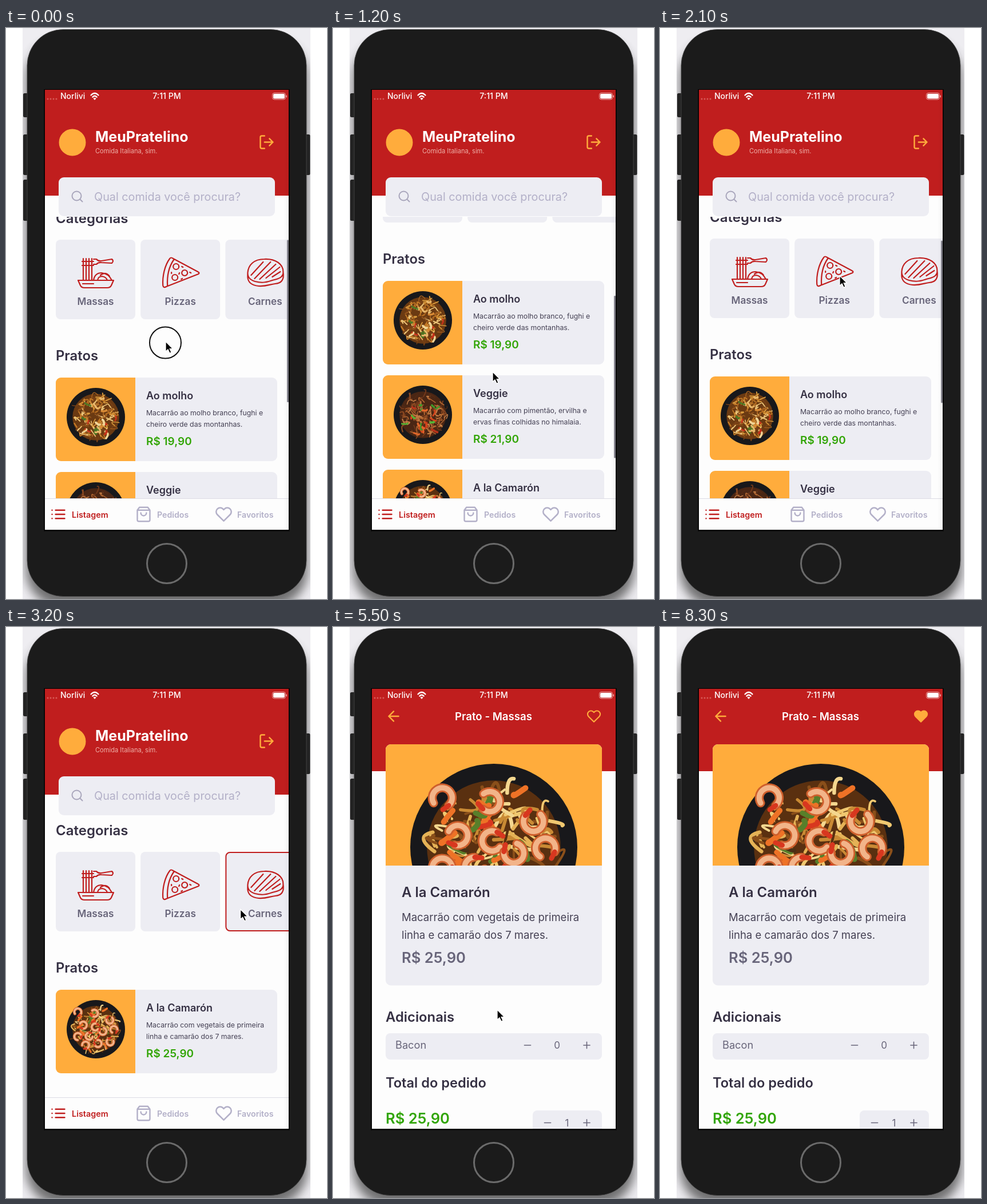
Animation of 561 by 998 pixels, one loop 8.4 s. Source, as an HTML page:

```html
<!DOCTYPE html>
<html lang="pt">
<head>
<meta charset="utf-8">
<title>Cardápio</title>
<style>
  html, body { margin: 0; width: 100%; height: 100%; overflow: hidden; background: #fff; }
  svg { display: block; width: 561px; height: 998px; }
  text { font-family: Inter, "Open Sans", sans-serif; white-space: pre; }
  .line { fill: none; stroke-linecap: round; stroke-linejoin: round; }
</style>
</head>
<body>
<script>
const RED = '#c01e1e', ORANGE = '#ffac3c', PANEL = '#ededf3', INK = '#353043',
      GREY = '#68657a', PALE = '#b3b0c8', GREEN = '#31a505', PAPER = '#fdfdfd';
const LOOP = 8400, STEP = 100;

const text = (x, y, size, fill, str, weight = 400, extra = '') =>
  `<text x="${x}" y="${y}" font-size="${size}" fill="${fill}" font-weight="${weight}" ${extra}>${str}</text>`;
const rect = (x, y, w, h, fill, r = 0, extra = '') =>
  `<rect x="${x}" y="${y}" width="${w}" height="${h}" rx="${r}" fill="${fill}" ${extra}/>`;
const stroke = (d, color, width = 2, extra = '') =>
  `<path class="line" d="${d}" stroke="${color}" stroke-width="${width}" ${extra}/>`;
const at = (x, y, body, id = '') => `<g id="${id}" transform="translate(${x} ${y})">${body}</g>`;

// Icons live on a 24 x 24 grid and are placed by their centre.
const shapes = {
  search: 'M19 11a8 8 0 1 1-16 0a8 8 0 0 1 16 0M21 21l-4.3-4.3',
  exit: 'M9 21H5a2 2 0 0 1-2-2V5a2 2 0 0 1 2-2h4M16 17l5-5-5-5M21 12H9',
  heart: 'M20.8 4.6a5.5 5.5 0 0 0-7.8 0L12 5.7l-1-1.1a5.5 5.5 0 0 0-7.8 7.8L12 21.2l8.8-8.8a5.5 5.5 0 0 0 0-7.8z',
  bag: 'M6 2L3 6v14a2 2 0 0 0 2 2h14a2 2 0 0 0 2-2V6l-3-4zM3 6h18M16 10a4 4 0 0 1-8 0',
  list: 'M8 6h13M8 12h13M8 18h13M3 6h.01M3 12h.01M3 18h.01',
  back: 'M19 12H5M12 19l-7-7 7-7',
  plus: 'M12 5v14M5 12h14',
  minus: 'M5 12h14'
};
const icon = (name, x, y, scale, color, width = 2, id = '') =>
  stroke(shapes[name], color, width, `id="${id}" transform="translate(${x} ${y}) scale(${scale}) translate(-12 -12)"`);

function seeded(seed) {
  return () => (seed = (seed * 16807) % 2147483647) / 2147483647;
}

// A dark round pan with loose curls of food, radius 100.
function plate(seed, base, noodles, bits, shrimps = []) {
  const rnd = seeded(seed);
  const spot = reach => {
    const a = rnd() * 6.283, d = Math.sqrt(rnd()) * reach;
    return [Math.cos(a) * d, Math.sin(a) * d].map(Math.round);
  };
  const pick = list => list[Math.floor(rnd() * list.length)];
  let out = `<circle r="100" fill="#18181b"/><circle r="80" fill="${base}"/>`;
  for (let i = 0; i < 110; i++) {
    const [x, y] = spot(74), [dx, dy] = spot(36), [ex, ey] = spot(24);
    out += stroke(`M${x} ${y}q${dx} ${dy} ${ex} ${ey}`, pick(noodles), 2.5 + rnd() * 2);
  }
  for (let i = 0; i < 22; i++) {
    const [x, y] = spot(70), [dx, dy] = spot(22);
    out += stroke(`M${x} ${y}q${dy / 3} 4 ${dx} ${dy}`, pick(bits), 5 + rnd() * 3);
  }
  shrimps.forEach(([x, y], i) => {
    const place = `transform="translate(${x} ${y}) rotate(${i * 83})"`;
    const arc = 'M-11 7A12 12 0 1 1 7 10';
    out += stroke(arc, '#cf5f2c', 10.5, place) + stroke(arc, '#f2b489', 6.5, place) +
      stroke('M7 10l-7 5', '#d8371f', 6, place);
  });
  return out;
}

const shrimps = [[-61, -60], [-4, -54], [47, -30], [-3, -8], [62, 0], [-42, -14], [24, 8],
  [-24, 24], [-62, 24], [-34, 54], [8, 50], [48, 44]];
const foods = [
  plate(11, '#6b3a12', ['#d99a3c', '#c47a26', '#ecc478', '#a5601f', '#7a4216'],
    ['#c5321a', '#e8b76c', '#4e7a24', '#f2d597', '#d88a35']),
  plate(29, '#4a2614', ['#8d4a22', '#b06530', '#73391b', '#c47d45', '#542a15'],
    ['#d4451c', '#3f9a2a', '#54b636', '#e0662a', '#b8331a']),
  plate(47, '#5a3010', ['#e5b256', '#f4d78f', '#c98a34', '#f0c870', '#8a4f1a', '#5a3010'],
    ['#d8371f', '#ee7226', '#587f2a', '#ee7226', '#4b3016'], shrimps)
];

const dishes = [
  ['Ao molho', 'Macarrão ao molho branco, fughi e', 'cheiro verde das montanhas.', 'R$ 19,90'],
  ['Veggie', 'Macarrão com pimentão, ervilha e', 'ervas finas colhidas no himalaia.', 'R$ 21,90'],
  ['A la Camarón', 'Macarrão com vegetais de primeira', 'linha e camarão dos 7 mares.', 'R$ 25,90']
];
const dishCard = ([name, one, two, price], i) => at(87, 634 + 165 * i,
  rect(0, 0, 387, 146, PANEL, 9) +
  `<path d="M9 0H139V146H9a9 9 0 0 1-9-9V9a9 9 0 0 1 9-9z" fill="${ORANGE}"/>` +
  `<g transform="translate(70 69) scale(.51)">${foods[i]}</g>` +
  text(158, 37.5, 18, INK, name, 600) +
  text(158, 66, 12.3, '#454154', one) + text(158, 85.5, 12.3, '#454154', two) +
  text(158, 118, 19, GREEN, price, 600), 'dish' + i);

const dot = (x, y, r) => `M${x - r} ${y}a${r} ${r} 0 1 0 ${2 * r} 0a${r} ${r} 0 1 0 ${-2 * r} 0`;
const categories = [
  ['Massas', 'M48 33V70M53 33V70M58 33V70M63 33V70M46 38H66M46 45H66M66 34H71Q74 38 80 37L98 34Q102 37 98 41L80 40Q74 39 71 43H66' +
    'M39 71H101L97 80Q95 84 90 84H50Q45 84 43 80ZM66 71Q68 58 80 58Q92 59 98 71M73 71Q74 64 81 64Q88 65 90 71M47 77H66M78 62Q88 55 94 64'],
  ['Pizzas', 'M51 33C42 45 38 64 39 80Q40 85 45 82L101 60Q104 58 100 56L57 33Q53 30 51 33ZM58 35C49 48 46 64 47 81' +
    dot(62, 47, 5) + dot(77, 58, 5) + dot(60, 66, 5) + 'M72 47l2 1M68 58l-1 2M86 57l2 1M54 57v2M71 69l2-1'],
  ['Carnes', 'M39 58C40 44 50 34 68 34C88 33 101 43 101 56C102 67 90 69 82 71C72 75 64 76 52 73C43 70 39 66 39 58Z' +
    'M39 59V66C40 76 48 80 58 81C72 82 77 78 87 77C98 76 103 70 101 57M45 62L66 39M51 68L79 39M60 69L88 43M71 67L95 48M82 65L96 56']
];
const categoryCard = ([name, path], i) => at(87 + 148.2 * i, 393,
  rect(0, 0, 139, 139, PANEL, 8) +
  rect(1, 1, 137, 137, 'none', 7, `id="cat${i}" stroke="${RED}" stroke-width="0"`) +
  stroke(path, RED, 2.2) +
  text(69.5, 113.5, 17.2, GREY, name, 600, 'text-anchor="middle"'));

const listing = rect(68, 108, 427, 769, PAPER) + rect(68, 108, 427, 185, RED) +
  `<circle cx="116" cy="200" r="23.5" fill="${ORANGE}"/>` +
  text(156, 198.5, 25, '#fff', 'MeuPratelino', 700) +
  text(156, 219, 11.1, '#eeb0a8', 'Comida Italiana, sim.') +
  icon('exit', 455.5, 199.5, 1.22, ORANGE) +
  rect(92, 261, 378, 68, PANEL, 9) +
  icon('search', 124.5, 294.5, 1, '#a9a6bc') +
  text(154, 301.5, 19.8, PALE, 'Qual comida você procura?') +
  '<g clip-path="url(#view)">' + at(0, 0,
    text(87, 363.5, 24, INK, 'Categorias', 600) + categories.map(categoryCard).join('') +
    text(87, 604, 23.8, INK, 'Pratos', 600) + dishes.map(dishCard).join(''), 'content') + '</g>' +
  rect(491, 357, 3, 284, '#85848e', 1.5, 'id="bar"') +
  rect(68, 822, 427, 55, PAPER) + rect(68, 822, 427, 1, '#dcdbe4') +
  icon('list', 91.5, 850, 1.22, RED) + text(115, 855.5, 14.4, RED, 'Listagem', 600) +
  icon('bag', 240.5, 850, 1.22, PALE) + text(264, 856, 14.2, PALE, 'Pedidos', 600) +
  icon('heart', 380.5, 850, 1.27, PALE) + text(404, 856, 14.2, PALE, 'Favoritos', 600);

const [name, lineOne, lineTwo, price] = dishes[2];
const details = rect(58, 108, 10, 769, 'url(#edge)') +
  rect(68, 108, 427, 769, PAPER) + rect(68, 108, 427, 144, RED) +
  icon('back', 106, 156, 1.22, ORANGE) +
  text(280.5, 162.5, 18.6, '#fff', 'Prato - Massas', 600, 'text-anchor="middle"') +
  icon('heart', 456, 156, 1.06, ORANGE, 2, 'like') +
  rect(92, 205, 378, 421.5, PANEL, 9) +
  `<path d="M92 417V214a9 9 0 0 1 9-9H461a9 9 0 0 1 9 9V417z" fill="${ORANGE}"/>` +
  `<g clip-path="url(#photo)"><g transform="translate(281 385) scale(1.46)">${foods[2]}</g></g>` +
  text(120, 471.5, 24, INK, name, 600) +
  text(120, 514, 18.5, '#454154', lineOne) + text(120, 544.5, 18.5, '#454154', lineTwo) +
  text(120, 586.5, 25.6, GREY, price, 600) +
  text(92, 689.5, 23.8, INK, 'Adicionais', 600) +
  rect(92, 710, 378, 46, PANEL, 8) + text(109, 737, 18.2, GREY, 'Bacon') +
  icon('minus', 340, 731, .8, GREY) + text(391.5, 737, 17, GREY, '0', 400, 'text-anchor="middle"') +
  icon('plus', 443.5, 731, .8, GREY) +
  text(92, 805, 23.6, INK, 'Total do pedido', 600) +
  text(92, 867.5, 25.6, GREEN, price, 600) +
  rect(349, 845, 121, 46, PANEL, 8) +
  icon('minus', 375, 866.5, .8, GREY) + text(409, 872.5, 17, GREY, '1', 400, 'text-anchor="middle"') +
  icon('plus', 443.5, 866.5, .8, GREY);

const status = [72, 77, 82, 87].map(x => `<circle cx="${x + 1}" cy="124" r="1.5" fill="#d65c58"/>`).join('') +
  text(95, 124.3, 14, '#fff', 'Norlivi', 500) +
  stroke('M148.5 117.5Q155 110.5 161.5 117.5M151.3 120.7Q155 116.8 158.7 120.7', '#fff', 2.3) +
  '<path d="M155 126l-2.6-3q2.6-2 5.2 0z" fill="#fff"/>' +
  text(281, 124.3, 14.2, '#fff', '7:11 PM', 500, 'text-anchor="middle"') +
  rect(465.5, 113.5, 23, 11.5, 'none', 3.5, 'stroke="#e9a5a3"') + rect(467, 115, 20, 8.5, '#fff', 2) +
  rect(489.5, 117.5, 1.5, 4, '#e9a5a3', .7);

const phone = rect(29, 0, 503, 998, '#eeedf1') +
  '<g clip-path="url(#case)">' + rect(35, 22, 492, 990, '#444', 64, 'filter="url(#soft)" opacity=".75"') + '</g>' +
  [[30, 114, 42], [30, 186, 71], [30, 265, 72], [522, 186, 71]]
    .map(([x, y, h]) => rect(x, y, 9.5, h, '#232323', 2.5)).join('') +
  rect(37, 2.5, 488, 991, '#1b1b1b', 63, 'stroke="#4a4a4a" stroke-width=".8"') +
  '<circle cx="281" cy="936" r="34.5" fill="none" stroke="#6b6b6b" stroke-width="3"/>' +
  rect(66.5, 107, 429, 772.5, '#000');

const clip = (id, x, y, w, h) => `<clipPath id="${id}"><rect x="${x}" y="${y}" width="${w}" height="${h}"/></clipPath>`;
document.body.innerHTML = `<svg viewBox="0 0 561 998" xmlns="http://www.w3.org/2000/svg"><defs>
  ${clip('screen', 68, 108, 426, 769)}${clip('view', 68, 330, 427, 492)}
  ${clip('photo', 92, 205, 378, 212)}${clip('case', 29, 0, 503, 998)}
  <filter id="soft"><feGaussianBlur stdDeviation="9"/></filter>
  <linearGradient id="edge"><stop stop-opacity="0"/><stop offset="1" stop-opacity=".04"/></linearGradient></defs>
  ${phone}<g clip-path="url(#screen)">${at(0, 0, listing, 'listing')}${at(427, 0, details, 'details')}${status}</g>
  <circle id="ring" r="27.5" fill="none" stroke="#111" stroke-width="2"/>
  <path id="cursor" d="M0 0V17.5L4 13.8L7 20.3L10 19L7.2 12.7H12.7Z" fill="#000" stroke="#fff" stroke-width="1.3"/></svg>`;

const scrollSteps = [[0, 23], [100, 44], [200, 75], [300, 143], [400, 203], [500, 250], [600, 283], [700, 302], [800, 309],
  [900, 306], [1000, 284], [1100, 240], [1200, 192], [1300, 151], [1500, 98], [1700, 62], [1900, 38], [2100, 25], [2400, 22]];
const cursorSteps = [[0, 279, 548], [200, 279, 500], [900, 279, 500], [1200, 279, 601], [1500, 279, 601], [2100, 314, 433],
  [2600, 440, 450], [3000, 440, 450], [3700, 287, 669], [5800, 287, 669], [6500, 458, 156]];
const presses = [[0, 200], [900, 1200], [2700, 2900], [4000, 4200], [6700, 6900]];
const fadeSteps = [[4000, 1], [4100, .2], [4200, .2], [4300, .65], [4400, 1]];
const FILTER_AT = 2900, SLIDE_AT = 4233.5, LIKE_AT = 6900, CURSOR_OFF = 7500;

const smooth = k => k * k * (3 - 2 * k);
function track(steps, t, ease = k => k) {
  const i = steps.findIndex(s => s[0] > t);
  if (i < 0) return steps[steps.length - 1].slice(1);
  if (i === 0) return steps[0].slice(1);
  const a = steps[i - 1], b = steps[i], k = ease((t - a[0]) / (b[0] - a[0]));
  return a.slice(1).map((v, n) => v + (b[n + 1] - v) * k);
}
// Critically damped spring from 0 to 1.
function spring(ms) {
  const x = Math.max(0, ms) * .01826;
  return 1 - Math.exp(-x) * (1 + x);
}

const el = id => document.getElementById(id);
const set = (id, key, value) => el(id).setAttribute(key, value);
const move = (id, x, y) => set(id, 'transform', `translate(${x} ${y})`);
const show = (id, on) => set(id, 'visibility', on ? 'visible' : 'hidden');

function render(t) {
  const filtered = t >= FILTER_AT;
  const scroll = filtered ? 0 : track(scrollSteps, t)[0];
  const slide = t >= 5000 ? 1 : spring(t - SLIDE_AT);
  const [x, y] = track(cursorSteps, t, smooth);

  move('content', 0, -scroll);
  set('bar', 'y', 357 + scroll * .577);
  show('bar', t < 2700);
  show('dish0', !filtered);
  show('dish1', !filtered);
  move('dish2', 87, filtered ? 634 : 964);
  set('dish2', 'opacity', track(fadeSteps, t)[0]);
  set('cat2', 'stroke-width', filtered ? 2 : 0);
  move('listing', -130 * slide, 0);
  move('details', 427 * (1 - slide), 0);
  set('like', 'style', `fill:${t >= LIKE_AT ? ORANGE : 'none'}`);
  move('cursor', x, y);
  move('ring', x - .5, y + 2);
  show('cursor', t < CURSOR_OFF);
  show('ring', presses.some(([from, to]) => t >= from && t < to));
}

const start = performance.now();
function tick() {
  const t = (performance.now() - start) % LOOP;
  render(Math.floor(t / STEP) * STEP);
  requestAnimationFrame(tick);
}
tick();
</script>
</body>
</html>
```
